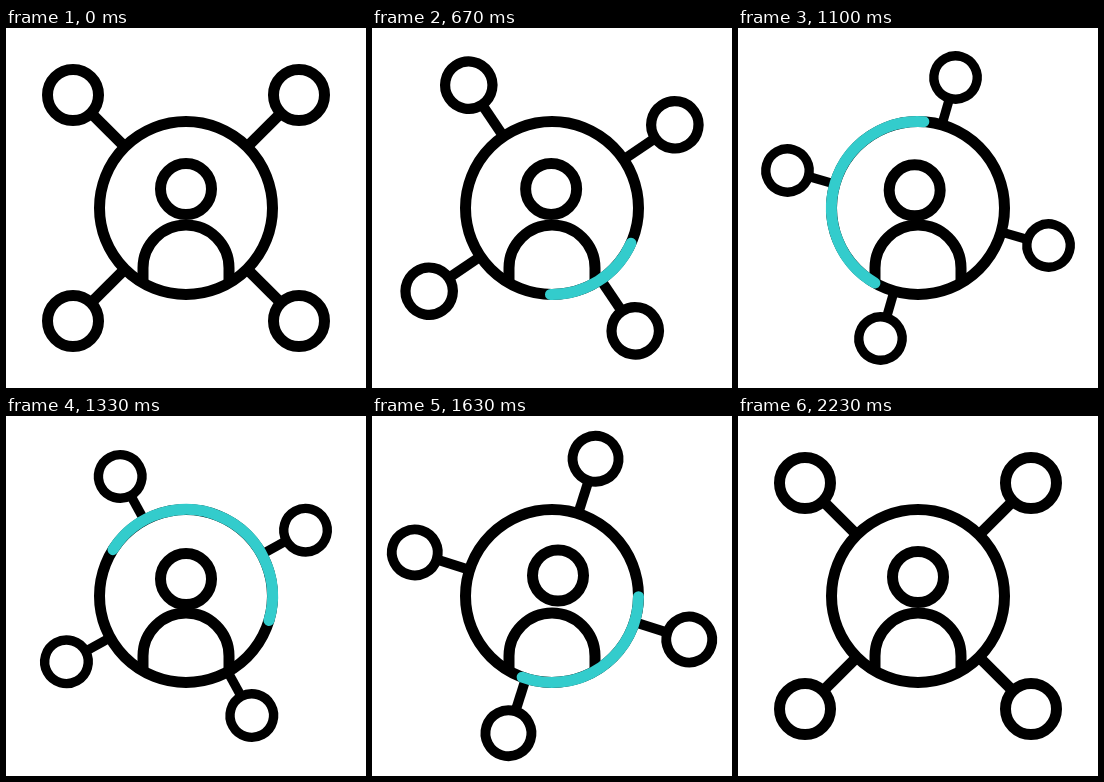
These frames come from a looping animation (360 by 360 pixels, 2.5 s). An HTML page:

```html
<!DOCTYPE html>
<html>
<head>
<meta charset="utf-8">
<style>
html, body { margin: 0; width: 100%; height: 100%; overflow: hidden; background: #fff; }
svg { display: block; width: 100vw; height: 100vh; }
</style>
</head>
<body>
<svg viewBox="0 0 360 360" fill="none" stroke="#000" stroke-width="11">
  <g id="nodes"></g>
  <circle cx="180" cy="180" r="86.5" fill="#fff"/>
  <path d="M137 252V240A43 43 0 0 1 223 240V252"/>
  <circle id="head" cx="180" cy="161" r="25.5"/>
  <path id="sweep" stroke-linecap="round"/>
</svg>
<script>
const LOOP = 2500, START = 260, END = 2240;
const $ = id => document.getElementById(id);

$('nodes').innerHTML = [45, 135, 225, 315].map(a =>
  `<g transform="rotate(${a})"><path d="M91 0H135"/><circle cx="159.8" r="25.5"/></g>`).join('');

// Symmetric ease-in-out, cubic-bezier(.55, 0, .45, 1), between two times
function ease(t, from, to) {
  const x = Math.min(1, Math.max(0, (t - from) / (to - from)));
  let lo = 0, hi = 1;
  for (let i = 0; i < 24; i++) {
    const u = (lo + hi) / 2, v = 1 - u;
    if (1.65 * v * v * u + 1.35 * v * u * u + u * u * u < x) lo = u; else hi = u;
  }
  return lo * lo * (3 - 2 * lo);
}

// Smooth curve through [time, value] keys, at rest at both ends
function curve(keys, t) {
  const last = keys.length - 1;
  if (t <= keys[0][0]) return keys[0][1];
  if (t >= keys[last][0]) return keys[last][1];
  const i = keys.findIndex(k => k[0] > t) - 1;
  const slope = j => j === 0 || j === last ? 0 :
    (keys[j + 1][1] - keys[j - 1][1]) / (keys[j + 1][0] - keys[j - 1][0]);
  const [t0, a] = keys[i], [t1, b] = keys[i + 1];
  const d = t1 - t0, u = (t - t0) / d, v = 1 - u;
  return a * v * v * (1 + 2 * u) + b * u * u * (3 - 2 * u)
    + d * u * v * (slope(i) * v - slope(i + 1) * u);
}

const tail = [[380, 15], [470, 16], [870, 48], [1330, 212], [1630, 360], [1830, 449], [2080, 492]];
const tip = [[380, 15], [470, 22], [870, 169], [1330, 376], [1630, 470], [1830, 489], [2080, 492]];
const headX = [[600, 0], [870, -5], [1330, 0], [1630, 6], [1830, 1], [1930, 0]];
const headY = [[600, 0], [870, 0], [1330, 2], [1630, -1.5], [1830, 0], [1930, 0]];

function ringPoint(deg) {
  const a = deg * Math.PI / 180;
  return `${180 + 86.5 * Math.cos(a)} ${180 + 86.5 * Math.sin(a)}`;
}

function draw(t) {
  const turn = 180 * ease(t, START, END);
  const size = 1 - 0.15 * (ease(t, START, 1100) - ease(t, 1180, END));
  $('nodes').setAttribute('transform', `translate(180 180) rotate(${turn}) scale(${size})`);
  $('head').setAttribute('transform', `translate(${curve(headX, t)} ${curve(headY, t)})`);

  const a = curve(tail, t), b = curve(tip, t), sweep = $('sweep');
  sweep.setAttribute('d', t > 420 && t < 2060
    ? `M${ringPoint(a)}A86.5 86.5 0 ${b - a > 180 ? 1 : 0} 1 ${ringPoint(b)}` : '');
  sweep.setAttribute('stroke', t < 500 ? '#d4d4d4' : '#33cccc');
}

const begin = performance.now();
function tick() {
  draw((performance.now() - begin) % LOOP);
  requestAnimationFrame(tick);
}
tick();
</script>
</body>
</html>
```
